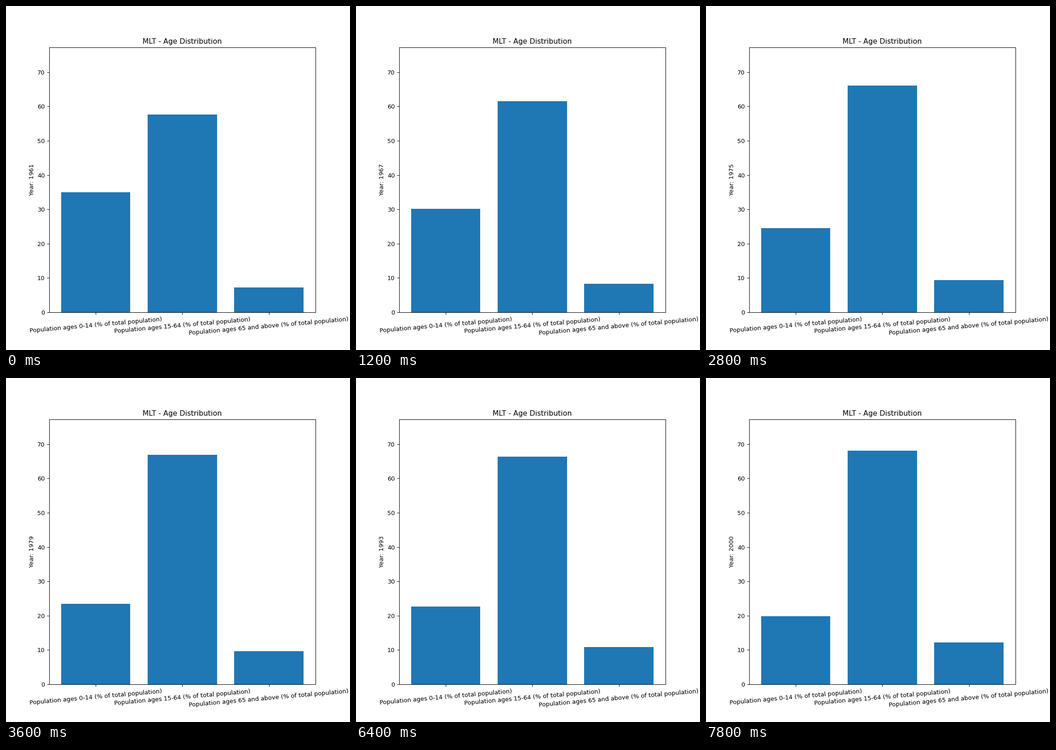
A matplotlib script for the animation above (8 s loop, 748 px wide and 748 px high).

```python
import numpy as np
import matplotlib.pyplot as plt
from matplotlib.animation import FuncAnimation

FIRST_YEAR, YEARS = 1961, 40
GROUPS = ["0-14", "15-64", "65 and above"]


def trend(u, start, end, *waves):
    """Straight line from start to end plus a short sine series."""
    bend = sum(a * np.sin(k * np.pi * u) for k, a in enumerate(waves, 1))
    return start + (end - start) * u + bend


def shares(i):
    u = i / (YEARS - 1)
    working = trend(u, 57.71, 68.05, 3.5, 1.565, -0.463, -0.26, 0.084)
    elderly = trend(u, 7.26, 12.15, -0.04, 0.455, 0, -0.065)
    return 100 - working - elderly, working, elderly


fig, ax = plt.subplots(figsize=(8, 8), dpi=93.5)
bars = ax.bar([f"Population ages {g} (% of total population)" for g in GROUPS],
              shares(0))
ax.set_ylim(0, 77.27)
ax.set_title("MLT - Age Distribution")
ax.tick_params(axis="x", labelrotation=5)
label = ax.set_ylabel(f"Year: {FIRST_YEAR}")


def update(i):
    for bar, value in zip(bars, shares(i)):
        bar.set_height(value)
    label.set_text(f"Year: {FIRST_YEAR + i}")
    return [*bars, label]


anim = FuncAnimation(fig, update, frames=YEARS, interval=200, repeat=True)
plt.show()
```
